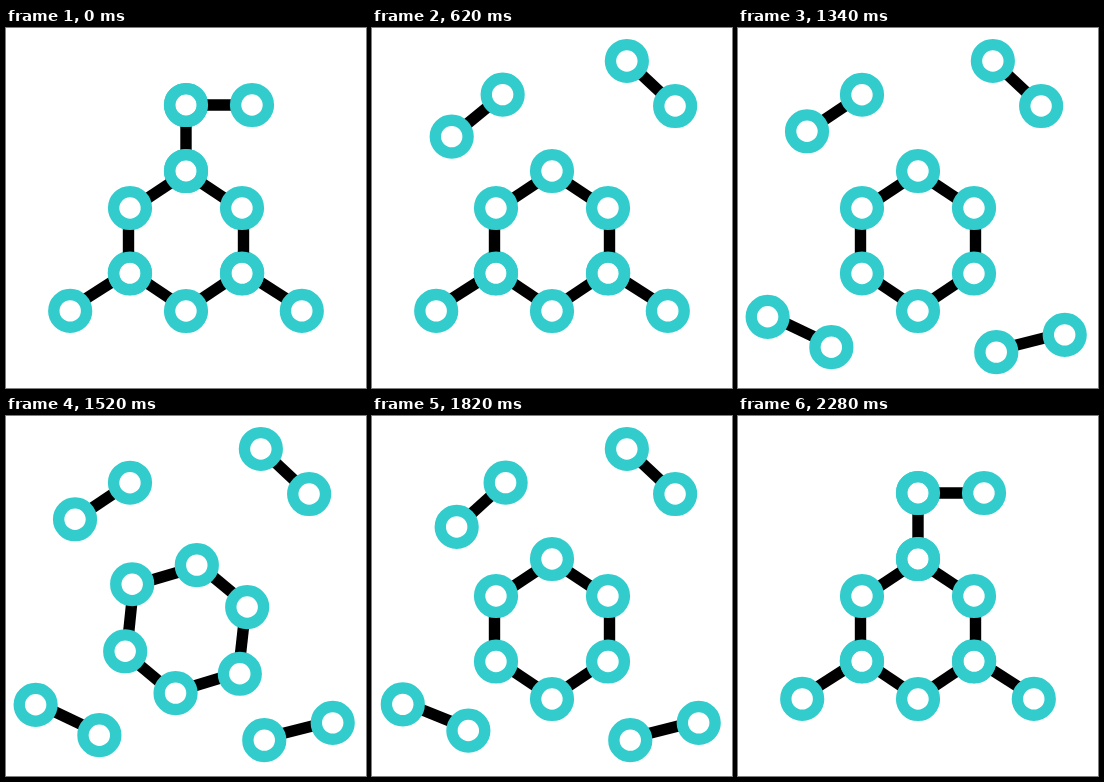
Animation of 360x360 px, one loop 2700 ms. Source, as an HTML page with a canvas:

```html
<!DOCTYPE html>
<html lang="en">
<head>
<meta charset="utf-8">
<title>Molecule</title>
<style>
  html, body { margin: 0; width: 100%; height: 100%; overflow: hidden; background: #fff; }
  canvas { display: block; }
</style>
</head>
<body>
<canvas id="stage" width="360" height="360"></canvas>
<script>
const ctx = document.getElementById('stage').getContext('2d');
const LOOP = 2700, ATOM = 16.4, STROKE = 11.4;

// Each pair: half length, sideways bond shift, home and away poses [x, y, degrees],
// start/end times out and back
const pairs = [
  { half: 33, shift: 0, home: [180, 110, 90], away: [96.5, 85, 146.4], out: [345, 690], back: [1735, 2085] },
  { half: 33, shift: 0, home: [213, 77, 0], away: [279, 55.5, 43], out: [0, 350], back: [1884, 2284] },
  { half: 35.3, shift: -2, home: [94, 264, -32.4], away: [61.5, 304, 25.5], out: [690, 1040], back: [1767, 2117] },
  { half: 35.3, shift: -2, home: [266, 264, 32.4], away: [292.5, 315.5, -14.2], out: [990, 1335], back: [1860, 2280] }
];
const ring = {
  x: 180, y: 213, spin: [1340, 1786],
  atoms: [[0, -70], [56, -33], [56, 32.5], [0, 70], [-56, 32.5], [-56, -33]]
};

// Smooth ease from 0 to 1 between two times
function ease(t, [start, end]) {
  const u = Math.min(1, Math.max(0, (t - start) / (end - start)));
  return u * u * (3 - 2 * u);
}

function rotate([x, y], angle) {
  const c = Math.cos(angle), s = Math.sin(angle);
  return [x * c - y * s, x * s + y * c];
}

// Line between the rims of two atoms, moved sideways by shift
function bond([x1, y1], [x2, y2], shift) {
  const length = Math.hypot(x2 - x1, y2 - y1);
  const ux = (x2 - x1) / length, uy = (y2 - y1) / length;
  const sx = -uy * shift, sy = ux * shift;
  ctx.strokeStyle = '#000';
  ctx.beginPath();
  ctx.moveTo(x1 + ux * ATOM + sx, y1 + uy * ATOM + sy);
  ctx.lineTo(x2 - ux * ATOM + sx, y2 - uy * ATOM + sy);
  ctx.stroke();
}

function atom([x, y]) {
  ctx.strokeStyle = '#33cccc';
  ctx.beginPath();
  ctx.arc(x, y, ATOM, 0, 2 * Math.PI);
  ctx.stroke();
}

function drawPair({ half, shift, home, away, out, back }, t) {
  const p = ease(t, out) - ease(t, back);
  const [x, y, degrees] = home.map((v, i) => v + (away[i] - v) * p);
  const [dx, dy] = rotate([half, 0], degrees * Math.PI / 180);
  const ends = [[x - dx, y - dy], [x + dx, y + dy]];
  bond(...ends, shift);
  ends.forEach(atom);
}

function drawRing(t) {
  const angle = 2 * Math.PI * ease(t, ring.spin);
  const atoms = ring.atoms.map(point => {
    const [x, y] = rotate(point, angle);
    return [ring.x + x, ring.y + y];
  });
  // Upright bonds sit slightly outside the hexagon, slanted ones slightly inside
  atoms.forEach((a, i) => bond(a, atoms[(i + 1) % 6], i % 3 === 1 ? -1.5 : 1.5));
  atoms.forEach(atom);
}

function draw(t) {
  ctx.fillStyle = '#fff';
  ctx.fillRect(0, 0, 360, 360);
  ctx.lineWidth = STROKE;
  pairs.forEach(pair => drawPair(pair, t));
  drawRing(t);
}

function frame() {
  draw(performance.now() % LOOP);
  requestAnimationFrame(frame);
}
frame();
</script>
</body>
</html>
```
